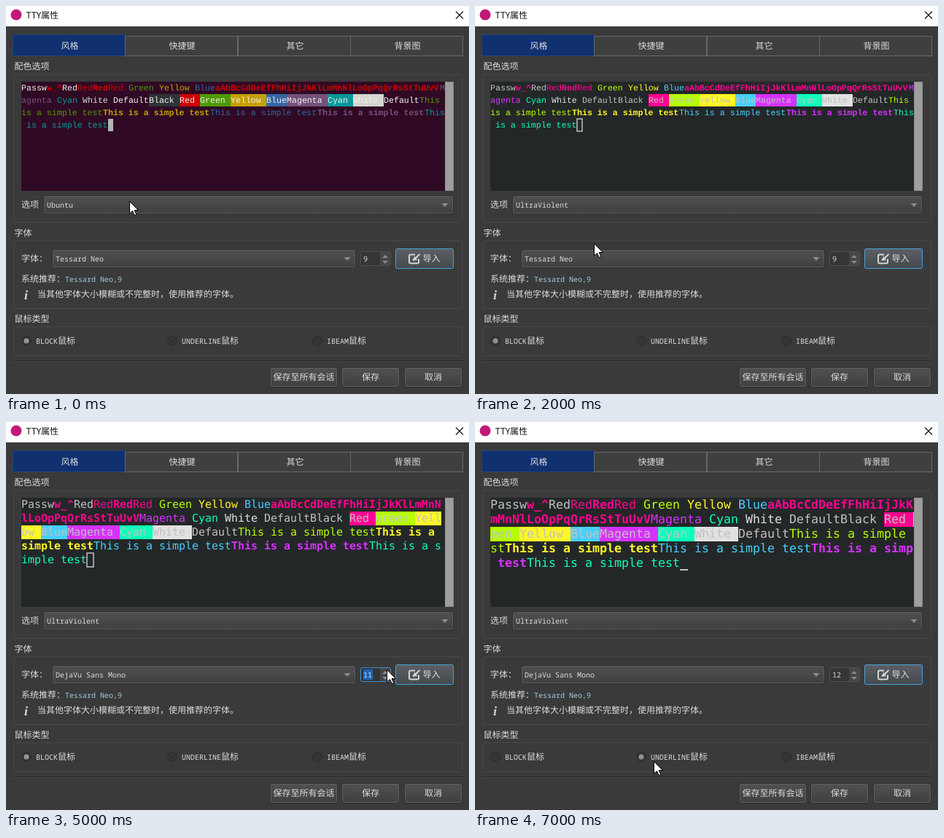
Animation, 635 px wide and 533 px high, one loop 8 s. Source, as an HTML page:

```html
<!DOCTYPE html>
<html lang="zh">
<head>
<meta charset="utf-8">
<title>TTY属性</title>
<style>
  html, body { margin: 0; width: 100%; height: 100%; overflow: hidden; background: #3a3a3a; }
  svg { display: block; width: 100%; height: 100%; }
  text { white-space: pre; text-rendering: geometricPrecision; font: 12px "Noto Sans CJK SC", "Noto Sans CJK", sans-serif; }
  .latin { font: 10px "Noto Sans Mono", monospace; }
  .stub { font-family: "Liberation Mono", monospace; }
  .dejavu { font-family: "DejaVu Sans Mono", monospace; }
</style>
</head>
<body>
<svg id="stage" viewBox="0 0 635 533">
  <defs>
    <linearGradient id="raised" x2="0" y2="1"><stop stop-color="#505050"/><stop offset="1" stop-color="#404040"/></linearGradient>
    <linearGradient id="accent" x2="0" y2="1"><stop stop-color="#5b6066"/><stop offset="1" stop-color="#45494e"/></linearGradient>
    <clipPath id="screen"><path d="M21 104H602V254H21z"/></clipPath>
  </defs>
  <g id="scene"></g>
</svg>
<script>
const SCHEMES = {
  Ubuntu: { back: "#300a24", d: "#eeeeec", k: "#2e3436", r: "#cc0000", g: "#4e9a06", y: "#c4a000",
            b: "#3465a4", m: "#75507b", c: "#06989a", w: "#d3d7cf" },
  UltraViolent: { back: "#242728", d: "#c1c1c1", k: "#242728", r: "#ff0090", g: "#b6ff00", y: "#fff727",
                  b: "#47d0fb", m: "#d731ff", c: "#0effbb", w: "#e1e1e1" }
};

const STUB = "Tessard Neo", DEJAVU = "DejaVu Sans Mono";
const THEMES = ["Tango Adapted", "Tango Half Adapted", "Teerb", "Terminal Basic", "Thayer Bright", "The Gorm",
  "Tomorrow", "Tomorrow Night", "Tomorrow Night Blue", "Tomorrow Night Bright", "Tomorrow Night Burns",
  "Tomorrow Night Eighties", "ToyChest", "Treehouse", "Twilight", "Ubuntu", "UltraViolent", "UnderTheSea",
  "Unikitty", "Urple", "Vaughn", "VibrantInk", "Violet Dark", "Violet Light", "WarmNeon", "Wez", "Whimsy"];
const FONTS = ["Quillomb", "Tessard", STUB, DEJAVU, "Gridwelt", "Ombrel Keyline", "QV Sablet",
  "NorVel-ExtB", "Terminal", "仿宋", "新宋体", "楷体"];

// [text, foreground, background, bold]
const TEST = "This is a simple test";
const RUNS = [
  ["Passw", "d"], ["w_^", "r", "", 1], ["Red", "d"], ["Red", "r"], ["Red", "r", "", 1], ["Red", "r"],
  [" Green ", "g"], ["Yellow ", "y"], ["Blue", "b"],
  ["aAbBcCdDeEfFhHiIjJkKlLmMnNlLoOpPqQrRsStTuUvV", "r", "", 1],
  ["Magenta ", "m"], ["Cyan ", "c"], ["White ", "w"], ["Default", "d"],
  ["Black ", "d", "k"], ["Red ", "d", "r"], ["Green ", "d", "g"], ["Yellow ", "d", "y"], ["Blue", "d", "b"],
  ["Magenta ", "d", "m"], ["Cyan ", "d", "c"], ["White ", "d", "w"], ["Default", "d"],
  [TEST, "g"], [TEST, "y", "", 1], [TEST, "b"], [TEST, "m", "", 1], [TEST, "c"]
];

// Character grid for each font size
const GRIDS = {
  [STUB + 9]: { advance: 7, line: 17, cols: 83 },
  [DEJAVU + 9]: { advance: 7, line: 16, cols: 83 },
  [DEJAVU + 11]: { advance: 9, line: 19, cols: 64 },
  [DEJAVU + 12]: { advance: 10, line: 20, cols: 60 }
};

const base = { scheme: "UltraViolent", font: DEJAVU, size: 9, caret: "outline" };
const STATES = [
  { ...base, scheme: "Ubuntu", font: STUB, caret: "block", mouse: [169, 268] },
  { ...base, scheme: "Ubuntu", font: STUB, caret: "block", mouse: [163, 326], popup: "themes" },
  { ...base, font: STUB, mouse: [163, 326] },
  { ...base, font: STUB, mouse: [166, 361], popup: "fonts" },
  { ...base, mouse: [240, 374] },
  { ...base, size: 11, mouse: [522, 340], editing: true },
  { ...base, size: 12, mouse: [431, 383], editing: true },
  { ...base, size: 12, mouse: [245, 466], caret: "underline" }
];

const INK = "#dcdcdc", BLUE = "#10306f";

const rect = (x, y, w, h, fill) => `<rect x="${x}" y="${y}" width="${w}" height="${h}" fill="${fill}"/>`;
const box = (x, y, w, h, fill, stroke, r = 0) =>
  `<rect x="${x + .5}" y="${y + .5}" width="${w - 1}" height="${h - 1}" rx="${r}" fill="${fill}" stroke="${stroke}"/>`;
const path = (d, fill, extra = "") => `<path d="${d}" fill="${fill}" ${extra}/>`;

// Latin runs are half the width of the ideographs beside them
function label(text, x, middle, fill = INK, anchor = "start") {
  const runs = text.replace(/[ -~]+/g, run => `<tspan class="latin">${run}</tspan>`);
  return `<text x="${x}" y="${middle + 4}" fill="${fill}" text-anchor="${anchor}">${runs}</text>`;
}

const button = (text, x, y, w, h) =>
  box(x - 1, y - 1, w + 2, h + 2, "none", "#303030", 2) + box(x, y, w, h, "url(#raised)", "#616161", 2) +
  label(text, x + w / 2, y + h / 2, INK, "middle");

const triangle = (x, y, half, height) => path(`M${x - half} ${y}h${2 * half}l${-half} ${height}z`, "#8c8c8c");

const combo = (text, x, y, w) =>
  box(x - 1, y - 1, w + 2, 26, "none", "#303030", 2) + box(x, y, w, 24, "url(#raised)", "#5c5c5c", 2) +
  label(text, x + 4, y + 12) + triangle(x + w - 11, y + 10, 4.5, 5);

const group = (title, titleY, y, h) => label(title, 11.5, titleY) + box(10, y, 616, h, "none", "#474747", 2);

function terminal({ scheme, font, size, caret }) {
  const colors = SCHEMES[scheme], { advance, line, cols } = GRIDS[font + size];
  const baseline = Math.floor(line * .75), fontSize = advance / .602;
  const place = i => [21 + i % cols * advance, 104 + Math.floor(i / cols) * line];
  let index = 0, fills = "", glyphs = "";
  for (const [text, fore, back, bold] of RUNS) {
    for (let at = 0; at < text.length;) {
      const part = text.slice(at, at + cols - index % cols), [x, y] = place(index);
      if (back) fills += rect(x, y, part.length * advance, line, colors[back]);
      glyphs += `<text class="${font === STUB ? "stub" : "dejavu"}" x="${x}" y="${y + baseline}" fill="${colors[fore]}"
        style="font-size:${fontSize}px;font-weight:${bold ? 700 : 400}">${part}</text>`;
      at += part.length;
      index += part.length;
    }
  }
  const [x, y] = place(index);
  const carets = {
    block: () => rect(x, y, advance, line, "#b5b5b5"),
    outline: () => path(`M${x} ${y}h${advance}v${line}h${-advance}z`, "none", `stroke="${colors.d}" stroke-width="1.500"`),
    underline: () => rect(x, y + line - 2, advance + 1, 2, colors.d)
  };
  return rect(21, 104, 593, 150, colors.back) +
    `<g clip-path="url(#screen)">${fills}${glyphs}${carets[caret]()}</g>` + box(602, 104, 12, 150, "#9e9e9e", "#8c8c8c");
}

function spinner(size, editing) {
  return box(486, 337, 42, 20, "#353535", editing ? "#3b8fd6" : "#4f4f4f", 2) + rect(513, 338, 14, 18, "#464646") +
    triangle(520, 346, 4, -4) + triangle(520, 350, 4, 4) +
    (editing ? rect(490, 340, 13, 14, "#1c66b8") : "") + label(String(size), 490, 347);
}

function importButton() {
  const icon = path("M561 341.5h-6q-2 0-2 2v8q0 2 2 2h9q2 0 2-2v-4", "none", 'stroke="#d5d5d5" stroke-width="2"') +
    path("M567 340l-6 5.500v-2.500l-4 7 7.500-1-2-1.500 5.500-6z", "#d5d5d5");
  return box(534, 333, 80, 28, "url(#accent)", "#4aa0d8", 2) + icon + label("导入", 571.5, 347);
}

function radio(text, x, on) {
  return `<circle cx="${x}" cy="460" r="6.500" fill="#353535" stroke="#2b2b2b"/>` +
    (on ? `<circle cx="${x}" cy="460" r="3.500" fill="#929292"/>` : "") + label(text, x + 13, 460);
}

function popup(items, chosen, x, top, w, firstRow, indent) {
  const rows = items.map((item, i) => {
    const y = firstRow + i * 20;
    return (i === chosen ? box(x + 1, y, w - 2, 20, BLUE, "#0d2a62") : "") + label(item, x + indent, y + 10);
  });
  const shadow = rect(x + w, top + 4, 3, 560, "rgba(0,0,0,.45)");
  return shadow + box(x, top, w, 560, "#3a3a3a", "#606060") + rows.join("");
}

const cursor = ([x, y]) => `<path transform="translate(${x + .5} ${y + .5})"
  d="M0 0V16.500L4 13 6.800 19 9.300 18 6.600 12H12z" fill="#fff" stroke="#000"/>`;

function dialog(state) {
  const tabs = ["风格", "快捷键", "其它", "背景图"].map((name, i) => {
    const x = Math.round(9 + i * 154.3);
    return box(x, i ? 41 : 39, 155, i ? 28 : 30, i ? "#3f3f3f" : BLUE, i ? "#686868" : "#24457f") +
      label(name, x + 78.500, 55, INK, "middle");
  });
  const underline = state.caret === "underline";
  return [
    rect(0, 0, 635, 533, "#3a3a3a"), rect(0, 0, 635, 28, "#fff"),
    `<circle cx="14" cy="12" r="7.500" fill="#c2187a"/><text x="27.500" y="17" fill="#111">TTY属性</text>`,
    path("M617 7.500l10 10m0-10l-10 10", "none", 'stroke="#111" stroke-width="1.200"'),
    ...tabs,
    group("配色选项", 83, 94, 204), terminal(state),
    label("选项", 21, 273), combo(state.scheme, 52, 261, 561),
    group("字体", 312, 322, 94), label("字体：", 21, 347), combo(state.font, 64, 335, 415),
    spinner(state.size, state.editing), importButton(),
    label("系统推荐：", 21, 375), label(STUB + ",9", 81, 375, "#a3cbdc"),
    `<text x="25" y="403" fill="#d5d5d5" style="font:italic bold 18px 'Liberation Serif',serif">i</text>`,
    label("当其他字体大小模糊或不完整时，使用推荐的字体。", 43, 396),
    group("鼠标类型", 430, 440, 41),
    radio("BLOCK鼠标", 28, !underline), radio("UNDERLINE鼠标", 228, underline), radio("IBEAM鼠标", 427, false),
    rect(9, 487, 617, 1, "#2a2a2a"), rect(9, 488, 617, 1, "#464646"),
    button("保存至所有会话", 363, 497, 91, 26), button("保存", 461, 497, 78, 26), button("取消", 547, 497, 78, 26)
  ].join("");
}

const POPUPS = {
  themes: () => popup(THEMES, 16, 51, -10, 563, -2, 8),
  fonts: () => popup(FONTS, 3, 63, 294, 417, 295, 4)
};

const scene = document.getElementById("scene");
let shown = -1;
function tick() {
  const index = Math.floor(performance.now() / 1000) % STATES.length;
  if (index !== shown) {
    const state = STATES[index];
    scene.innerHTML = dialog(state) + (state.popup ? POPUPS[state.popup]() : "") + cursor(state.mouse);
    shown = index;
  }
  requestAnimationFrame(tick);
}
tick();
</script>
</body>
</html>
```
